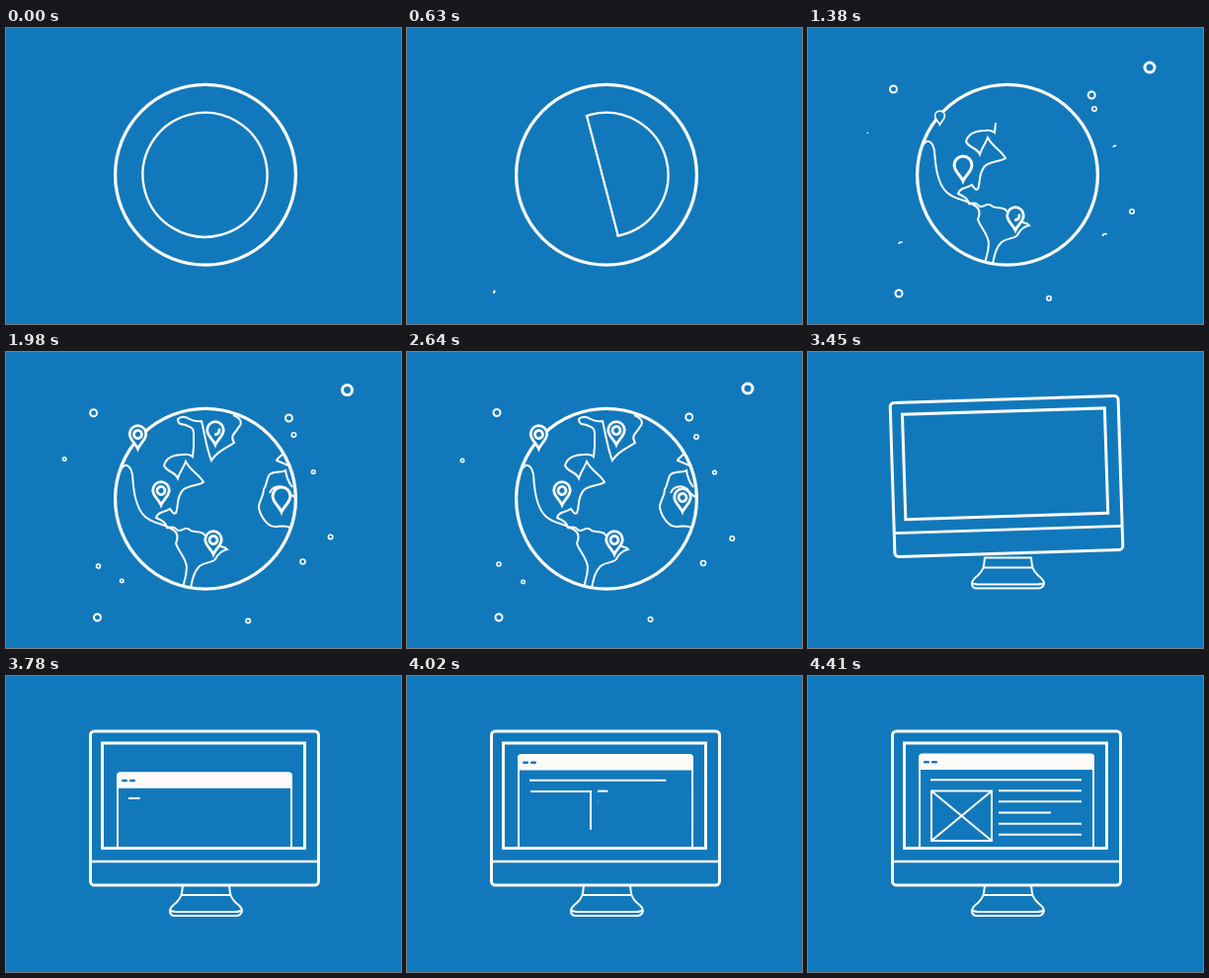
An HTML page with a canvas that plays this animation: 400x300 px, repeating every 6.62 s.

```html
<!DOCTYPE html>
<html lang="en">
<head>
<meta charset="utf-8">
<title>Globe to desktop</title>
<style>
html, body { margin: 0; width: 100%; height: 100%; overflow: hidden; background: #1179bb; }
canvas { display: block; width: 400px; height: 300px; }
</style>
</head>
<body>
<canvas id="stage" width="400" height="300"></canvas>
<script>
const LOOP = 6620, BLUE = '#1179bb', WHITE = '#fcfbf9', TAU = Math.PI * 2;
const CX = 202, CY = 148.8, RADIUS = 91.4;
const ctx = document.getElementById('stage').getContext('2d');

const span = (t, a, b) => Math.min(1, Math.max(0, (t - a) / (b - a)));
const inOut = u => u < .5 ? 2 * u * u : 1 - 2 * (1 - u) ** 2;
const outCubic = u => 1 - (1 - u) ** 3;
const outBack = u => 1 + 2.7 * (u - 1) ** 3 + 1.7 * (u - 1) ** 2;

function shape(d) {
  const el = document.createElementNS('http://www.w3.org/2000/svg', 'path');
  el.setAttribute('d', d);
  return { path: new Path2D(d), length: el.getTotalLength() };
}

const americas = shape('M117 118C121 112 126 115 128 124C129 140 131 158 141 167C149 174 160 174 167 179C174 182 175 187 172 194C175 203 182 208 183 218C183 228 180 233 179 239H187C189 230 190 223 196 217C203 212 209 214 212 210C215 204 219 201 224 200C221 196 216 199 214 194C210 186 202 190 200 184C194 181 190 183 187 181C181 175 177 184 173 180C169 175 166 179 163 178C162 173 159 171 152 168C154 161 161 163 166 159C169 163 170 165 172 163C175 157 172 148 179 140C186 134 194 136 200 132C196 124 187 121 182 111C180 117 176 121 174 128C171 121 163 122 160 115C163 105 172 104 179 104Q186 103 189 106L190 96');
const arctic = shape('M190 96V82C190 75 184 76 182 74C178 73 174 74 174 68C177 65 181 65 186 68Q191 71 198 70C201 82 203 98 208 110C213 101 222 98 231 92C226 84 233 82 235 77C239 73 240 68 230 64');
const africa = shape('M288 178C280 174 273 179 268 176C262 173 256 163 256 156C257 149 261 147 261 139C264 136 264 127 267 124C273 120 279 123 283 120C284 127 286 132 290 137');
const europe = shape('M282 101C279 106 275 107 274 110L286 115');
const coast = shape('M267 143C270 135 279 135 284 139C285 143 288 144 292 147');
const pinBody = new Path2D('M0 0C-2 -5 -8.3 -9 -8.3 -15A8.3 8.3 0 0 1 8.3 -15C8.3 -9 2 -5 0 0Z');
const stand = new Path2D('M179 212C178 222 178 224 172 230C168 233 166 235 166 238C166 241 168 243 171 243H233C236 243 239 241 239 238C239 235 237 233 233 230C227 224 227 222 226 212ZM177 222H228M166 237Q168 239 172 239H232Q237 239 239 237');
const photo = shape('M125 116.5H186V167H125Z');

// tip x, tip y, start
const pins = [[210, 205, 1100], [157, 155, 1200], [133.5, 98, 1340], [212, 94, 1700], [279, 162, 1800]];

// x, y, drift x, drift y, radius, start
const dots = [
  [346, 40, -1, -3, 5, 800], [86.5, 62, 4.5, -.5, 3.5, 760], [287.2, 68, -1.5, -2, 3.5, 850],
  [290, 82, 3, 4, 2.2, 900], [92, 269, 1, 0, 3.5, 570], [244, 274, 2.5, -3, 2.2, 850],
  [328, 186, 1.3, 3, 2.2, 900], [301, 211, -1, 3, 2.5, 1230], [94, 219, -1, -4, 2, 1230],
  [311, 121, .5, 1, 1.8, 1230], [62, 107, -6, 3, 1.7, 1330], [117, 231, .5, 2, 1.7, 1500]
];

function stroke(path, width) {
  ctx.lineWidth = width;
  ctx.stroke(path);
}

function trim(s, u, width) {
  if (u <= 0) return;
  ctx.setLineDash(u < 1 ? [s.length * u, s.length * 2] : []);
  stroke(s.path, width);
  ctx.setLineDash([]);
}

function arc(x, y, r, u, width, start = 0) {
  if (u <= 0) return;
  ctx.beginPath();
  ctx.arc(x, y, r, start, start + TAU * u);
  ctx.lineWidth = width;
  ctx.stroke();
}

function line(x1, y1, x2, y2, u, width = 2) {
  if (u <= 0) return;
  ctx.beginPath();
  ctx.moveTo(x1, y1);
  ctx.lineTo(x1 + (x2 - x1) * u, y1 + (y2 - y1) * u);
  ctx.lineWidth = width;
  ctx.stroke();
}

function box(x, y, w, h, r, width) {
  ctx.beginPath();
  ctx.roundRect(x, y, w, h, r);
  if (width) {
    ctx.lineWidth = width;
    ctx.stroke();
  } else ctx.fill();
}

// Plain circle, wiped away by a slanted edge
function emblem(t) {
  const u = span(t, 30, 930) ** 1.77, edge = 118 + 163 * u;
  if (u >= 1) return;
  const tilt = .255, r = 63;
  const x = (201.5 - edge) * Math.cos(tilt), y = (201.5 - edge) * Math.sin(tilt);
  const half = Math.sqrt(Math.max(0, r * r - x * x));
  ctx.save();
  ctx.translate(edge, CY);
  ctx.rotate(-tilt);
  ctx.beginPath();
  ctx.rect(-1.2, -200, 400, 400);
  ctx.clip();
  arc(x, y, r, 1, 2.4);
  if (half) line(0, y - half, 0, y + half, 1, 2.4);
  ctx.restore();
}

function pin([x, y, start], t) {
  const u = span(t, start, start + 250);
  if (!u) return;
  ctx.save();
  ctx.translate(x, y);
  ctx.scale(outBack(u), outBack(u));
  ctx.fillStyle = BLUE;
  ctx.fill(pinBody);
  stroke(pinBody, 2.8);
  arc(0, -14.5, 4, span(t, start + 200, start + 420), 2.8, -.5);
  ctx.restore();
}

function globe(t) {
  const size = 1 - span(t, 2880, 3150) ** 2;
  if (size <= 0) return;
  ctx.save();
  ctx.translate(CX, CY);
  ctx.scale(size, size);
  ctx.translate(-CX, -CY);
  ctx.save();
  ctx.beginPath();
  ctx.arc(CX, CY, RADIUS, 0, TAU);
  ctx.clip();
  trim(americas, span(t, 720, 1380), 2);
  trim(arctic, span(t, 1380, 1750), 2);
  trim(africa, span(t, 1500, 1850), 2);
  trim(europe, span(t, 1700, 1900), 2);
  trim(coast, span(t, 1700, 1900), 2);
  ctx.restore();
  emblem(t);
  arc(CX, CY, RADIUS, 1, 3.3);
  pins.forEach(p => pin(p, t));
  ctx.restore();
}

function sky(t) {
  const move = (t - 1380) / 1260;
  dots.forEach(([x, y, dx, dy, r, start], i) => {
    const gone = span(t, 2790 + i * 12, 2990 + i * 12);
    const u = span(t, start, start + 400) - gone;
    arc(x + dx * move, y + dy * move, r, u, r > 4 ? 3 : r > 3 ? 2 : 1.6, Math.PI);
  });
}

function browser(t) {
  const dy = 96 * (1 - outCubic(span(t, 3540, 4110)));
  ctx.save();
  ctx.beginPath();
  ctx.rect(99, 69, 202, 105);
  ctx.clip();
  ctx.translate(0, dy);
  box(113, 80, 176, 120, 3, 2);
  ctx.fillStyle = WHITE;
  box(112, 78.5, 178, 16.5, [4, 4, 0, 0]);
  ctx.fillStyle = BLUE;
  box(117, 86, 6, 2.6, 1.3);
  box(125, 86, 6, 2.6, 1.3);
  line(124, 105.3, 277, 105.3, inOut(span(t, 3700, 4110)));
  trim(photo, span(t, 3850, 4230), 2);
  line(125, 116.5, 186, 167, span(t, 4020, 4260));
  line(186, 116.5, 125, 167, span(t, 4080, 4300));
  [116.3, 127.3, 138.5, 149.7, 160.7].forEach((y, i) =>
    line(193, y, i === 2 ? 246 : 277, y, inOut(span(t, 3960 + i * 50, 4200 + i * 50))));
  ctx.restore();
}

function desktop(t) {
  if (t < 3150) return;
  const fall = 1 - span(t, 3150, 3330) ** 2;
  const hop = Math.sin(Math.PI * span(t, 3330, 3570));
  const grow = outCubic(span(t, 3180, 3330));
  ctx.save();
  ctx.translate(202, 243 - 3.5 * hop);
  ctx.scale(grow, grow);
  ctx.translate(-202, -243);
  stroke(stand, 2);
  ctx.restore();

  ctx.save();
  ctx.translate(201, 133.7 - 230 * fall - 8 * hop);
  ctx.rotate(-(6 * fall + 1.8 * hop) * Math.PI / 180);
  ctx.translate(-201, -133.7);
  ctx.fillStyle = BLUE;
  box(85.5, 56, 231, 156, 4);
  box(85.5, 56, 231, 156, 4, 3);
  line(86, 188, 316, 188, 1, 2.6);
  browser(t);
  box(97.5, 68, 205, 106.5, 0, 3);
  ctx.restore();
}

function draw(now) {
  const t = now % LOOP;
  ctx.fillStyle = BLUE;
  ctx.fillRect(0, 0, 400, 300);
  ctx.strokeStyle = WHITE;
  sky(t);
  globe(t);
  desktop(t);
}

let begin;
function tick(now) {
  begin ??= now;
  draw(now - begin);
  requestAnimationFrame(tick);
}
draw(0);
requestAnimationFrame(tick);
</script>
</body>
</html>
```
